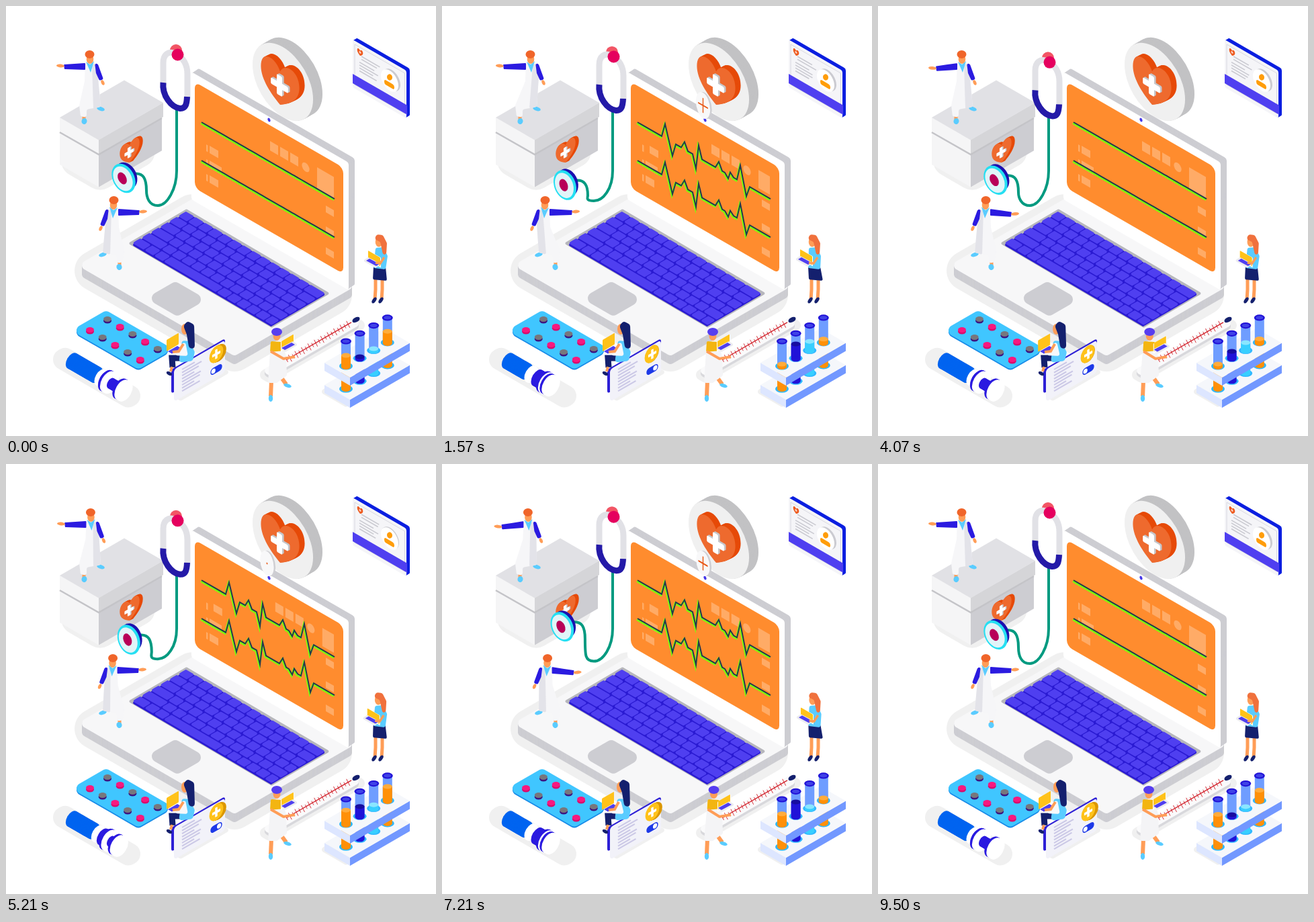
Animation of 640 by 640 pixels, one loop 9570 ms. Source, as an HTML page with a canvas:

```html
<!DOCTYPE html>
<html lang="en">
<head>
<meta charset="utf-8">
<title>Online medicine</title>
<style>
html, body { margin: 0; width: 100%; height: 100%; overflow: hidden; background: #fff; }
canvas { display: block; width: 640px; height: 640px; }
</style>
</head>
<body>
<canvas id="stage" width="640" height="640"></canvas>
<script>
const g = document.getElementById('stage').getContext('2d');
const LOOP = 9570, HALF = LOOP / 2, STEP = 1000 / 14, TAU = Math.PI * 2;
const SLOPE = .577, COS = .866;
const SKIN = '#ff9d57', HAIR = '#f0652a', BLUE = '#2b1be0', NAVY = '#14206e', CYAN = '#5accff';
const GOLD = '#ffc21a', SHADE = '#f0f0f0', GREY = '#cdcdd2', VIOLET = '#4f3ff0', GLASS = 'rgba(255,255,255,.27)';
let now = 0, phase = 0;

// Timing
const mix = (a, b, k) => a + (b - a) * k;
const ramp = (t, a, b) => (1 - Math.cos(Math.PI * Math.min(1, Math.max(0, (t - a) / (b - a))))) / 2;
const spell = (inFrom, inTo, outFrom, outTo) => ramp(phase, inFrom, inTo) * (1 - ramp(phase, outFrom, outTo));
const wave = (peak, period = HALF / 2) => Math.cos((phase - peak) / period * TAU);

// Drawing
function paint(fill, stroke, width) {
  if (fill) { g.fillStyle = fill; g.fill(); }
  if (stroke) { g.strokeStyle = stroke; g.lineWidth = width; g.stroke(); }
}
function poly(fill, pts, r = 0) {
  const first = pts[0], last = pts[pts.length - 1];
  g.beginPath();
  g.moveTo((first[0] + last[0]) / 2, (first[1] + last[1]) / 2);
  pts.forEach((p, i) => g.arcTo(...p, ...pts[(i + 1) % pts.length], r));
  g.closePath();
  paint(fill);
}
function oval(fill, x, y, rx, ry = rx, turn = 0) {
  g.beginPath();
  g.ellipse(x, y, rx, ry, turn, 0, TAU);
  paint(fill);
}
function line(color, width, ...pts) {
  g.beginPath();
  pts.forEach(p => g.lineTo(...p));
  paint(null, color, width);
}
const slanted = (color, width, x, y, w, dir) => line(color, width, [x, y], [x + w, y + w * SLOPE * dir]);

// Upright plane: dir 1 falls to the right, -1 rises.
function plane(x, y, dir, draw, sx = COS) {
  g.save();
  g.transform(sx, dir * sx * SLOPE, 0, 1, x, y);
  draw();
  g.restore();
}
function bar(fill, x, y, w, h, r = 0) {
  g.beginPath();
  g.roundRect(x, y, w, h, r);
  paint(fill);
}
const panel = (fill, x, y, w, h, dir, r) => plane(x, y, dir, () => bar(fill, 0, 0, w / COS, h, r));
function extrude(x, y, dir, dx, dy, side, front, shape) {
  const n = Math.max(1, Math.ceil(Math.hypot(dx, dy)));
  for (let i = n; i >= 0; i--) {
    plane(x + dx * i / n, y + dy * i / n, dir, () => shape(i ? side : front));
  }
}
// Flat rhombus from its left corner: a runs right-up, b runs right-down.
function floor(fill, x, y, a, b, r) {
  poly(fill, [[x, y], [x + a, y - a * SLOPE], [x + a + b, y + (b - a) * SLOPE], [x + b, y + b * SLOPE]], r);
}
function pad(x, y, a, b, h, side, top, r) {
  for (let i = h; i >= 0; i--) floor(i ? side : top, x, y + i, a, b, r);
}
function slab(x, y, a, b, h, left, right, top) {
  panel(left, x, y, b, h, 1);
  panel(right, x + b, y + b * SLOPE, a, h, -1);
  if (top) floor(top, x, y, a, b);
}
function heart(fill, s) {
  g.beginPath();
  g.moveTo(0, s);
  for (const k of [-s, s]) {
    g.moveTo(0, s);
    g.bezierCurveTo(.45 * k, .75 * s, k, .35 * s, k, -.25 * s);
    g.bezierCurveTo(k, -s, .25 * k, -1.05 * s, 0, -.5 * s);
  }
  paint(fill);
}
function cross(fill, s, w) {
  bar(fill, -w / 2, -s, w, s * 2, w / 5);
  bar(fill, -s, -w / 2, s * 2, w, w / 5);
}
function heartSign(x, y, dir, s, depth) {
  extrude(x, y, dir, depth, -depth / 2, '#e64a08', '#ee6a2e', c => heart(c, s));
  extrude(x - 1, y + s / 8, dir, depth / 3, -depth / 6, '#c6c6ca', '#fff', c => cross(c, s * .45, s * .28));
}

function heartDisc() {
  extrude(412, 113, 1, 14, -8, '#c2c2c4', '#f0f0f0', c => oval(c, 0, 0, 52));
  heartSign(408, 114, 1, 33, 8);
}

function keyboard() {
  const spot = (a, b) => [268 + a * 14.3 - b * 13.6, 305 + a * 8.4 + b * 8];
  const block = (fill, a0, a1, b0, b1, sink = 0) => poly(fill,
    [spot(a0, b0), spot(a1, b0), spot(a1, b1), spot(a0, b1)].map(([x, y]) => [x, y + sink]), 2);
  block('#b7b7bc', -.15, 14.8, -.2, 6.2);
  block('#2a1ad2', .05, 14.55, 0, 6, 2);
  for (let row = 0; row < 6; row++) {
    for (let a = 0, i = 0; a < 14.4; i++) {
      let w = i ? 1 : 1 + row * .27 % 1.1;
      if (row === 5 && i === 3) w = 5.5;
      if (a + w > 13.9) w = 14.6 - a;
      block(VIOLET, a + .04, a + w - .04, row + .06, row + .94);
      a += w;
    }
  }
}

function heartbeat(amp) {
  const peaks = [[332, -21], [343, 20], [361, -11], [378, 19], [382, -18],
    [412, -11], [426, 6], [429, -5], [444, -24], [453, 17]];
  const pts = [[291, 0]];
  let last = 291;
  for (const [x, d] of peaks) {
    if (x - last > 12) pts.push([last + 5, 0], [x - 5, 0]);
    pts.push([x, d * amp]);
    last = x;
  }
  pts.push([last + 5, 0], [489, 0]);
  for (const top of [173, 230]) {
    const curve = pts.map(([x, d]) => [x, top + (x - 291) * .576 + d]);
    line('#7dff0a', 3, ...curve.map(([x, y]) => [x - 1, y + 1.5]));
    line('#243a4c', 2, ...curve);
  }
}

function screen() {
  const m = spell(0, 400, 2300, 2800), shift = m * 8;
  const tile = (x, y, w, h) => panel(GLASS, x, y, w, h, 1);
  panel('#ff8c2e', 281, 113, 221, 158, 1, 9);
  for (let i = 0; i < 3; i++) {
    tile(393 + i * 15 + shift, 201 + i * 8.5 + shift * SLOPE, 12, 14);
    tile(476, mix(297, 288, m) + i * mix(31, 35, m), 12, 10);
    tile(298, 206 + i * 22, 2.5, 10);
    tile(303 + (i ? 0 : 6 * m), 208 + i * 22, 13 + i % 2 * 5, 11);
  }
  plane(446 + shift, 240 + shift * SLOPE, 1, () => oval(GLASS, 0, 0, 6.5));
  tile(463 + shift, 240 + m * 4, 25 - shift, mix(35, 27, m));
  heartbeat(ramp(phase, 0, 400) * (1 - ramp(phase, 2760, 3240)));
}

function laptop() {
  floor(SHADE, 72, 394, 205, 268, 30);
  pad(106, 386, 182, 234, 13, GREY, '#f7f7f8', 7);
  extrude(276, 98, 1, 9, -6, GREY, '#fff', c => bar(c, 0, 0, 234 / COS, 190, 4));
  screen();
  oval('#4436e8', 391.5, 169.5, 1.8, 3, -.4);
  floor(GREY, 208, 435, 44, 47, 9);
  keyboard();
}

function popup() {
  const hide = 1 - ramp(phase, 2300, 2700);
  const size = ramp(phase, 100, 400) * hide, arm = 11 * ramp(phase, 250, 800) * hide;
  if (size < .02) return;
  plane(391, 148, 1, () => oval('#cfcfd3', 0, 0, 19 * size), .56);
  plane(388.5, 148, 1, () => {
    oval('#f8f8f9', 0, 0, 19 * size);
    line('#e8530f', 2.4, [0, -arm], [0, arm]);
    line('#e8530f', 2.2, [-arm * 1.2, 0], [arm * 1.2, 0]);
  }, .56);
}

function box() {
  floor(SHADE, 58, 230, 106, 82, 24);
  slab(80, 166, 94, 58, 70, '#f5f5f6', GREY);
  slab(80, 166, 96, 58, 21, '#f5f5f6', '#d5d5d8', '#e1e1e5');
  line('#c4c4c8', 2.5, [80, 188], [138, 221], [232, 167]);
  heartSign(184, 216, -1, 17, 5);
}

function doctor() {
  const lean = spell(0, 1200, 1800, 2900) * 7, drop = spell(1800, 2900, 3300, 4700) * 8;
  const x = 125 + lean, hand = 81 + lean * .7, elbow = x + 18;
  line(SKIN, 5, [116, 160], [116, 171]);
  oval(CYAN, 116.5, 171.5, 4, 4.5, .3);
  oval(CYAN, 141, 153, 6, 3, .3);
  poly('#f6f6f8', [[x - 7, 83], [x + 8, 83], [x + 12, 105], [141, 150], [120, 154],
    [120, 166], [111, 164], [109, 148], [x - 8, 112]], 3);
  poly('#e3e3e9', [[x + 3, 88], [x + 9, 85], [x + 12, 107], [141, 150], [130, 153]], 2);
  poly(BLUE, [[x - 7, 85], [x - 7, 95], [hand + 6, 94 + drop * .8], [hand + 5, 87 + drop * .8]], 1);
  oval(SKIN, hand, 89 + drop, 6, 2.4, .1);
  poly(BLUE, [[x + 7, 84], [x + 12, 87], [elbow + 2, 109], [elbow - 4, 111], [x + 9, 100]], 2);
  oval(SKIN, elbow + 1, 114, 2.3, 4, -.4);
  poly(CYAN, [[x - 6, 83], [x, 87], [x + 6, 82], [x + 1, 99]]);
  oval(SKIN, x, 79, 5.3, 7);
  oval(HAIR, x - .5, 72, 7, 6);
}

function stethoscope() {
  const turn = now / LOOP * TAU, bob = 6 * (1 - Math.cos(turn));
  const m = spell(0, 400, 1800, 2900), x = 175 + m * 8;
  const y = 260 + 13.5 * Math.sin(turn) + 9 * wave(750);
  const low = mix(297, 290, m), elbow = x + 34, tilt = mix(-.48, -.36, m);
  g.lineCap = 'round';
  g.beginPath();
  g.moveTo(254, 152 + bob);
  g.lineTo(254, 245);
  g.bezierCurveTo(254, 272, 240, low, 226, low);
  g.bezierCurveTo(213, low, elbow, 285, elbow, Math.min(y + 18, 282));
  g.bezierCurveTo(elbow, y, elbow - 5, y - 8, x + 17, y - 7);
  paint(null, '#009a80', 4);
  g.save();
  g.translate(0, bob);
  oval('#f25565', 253, 66, 9);
  g.beginPath();
  g.moveTo(234, 116);
  g.lineTo(234, 85);
  g.bezierCurveTo(234, 72, 242, 66, 252, 71);
  g.bezierCurveTo(264, 76, 270, 88, 270, 101);
  g.lineTo(270, 137);
  paint(null, '#e1e1e6', 9);
  g.lineCap = 'butt';
  g.beginPath();
  g.moveTo(234, 114);
  g.bezierCurveTo(232, 133, 246, 151, 259, 152.5);
  g.bezierCurveTo(267, 153, 269, 147, 269.5, 135);
  paint(null, '#241aa8', 9);
  oval('#e5005e', 255.5, 72.5, 9);
  g.restore();
  oval('#1c10b0', x + 4, y - 4, 15, 21, tilt);
  oval('#25dff2', x, y, 16, 23, tilt);
  oval('#e1f4f8', x - 1, y + .5, 13, 19.5, tilt);
  oval('#b80058', x - 2, y, 6, 9.5, tilt);
}

function blister() {
  pad(97, 483, 52, 100, 2, '#188be8', '#40c6ff', 8);
  for (let i = 0; i < 10; i++) {
    const col = i >> 1, row = i % 2, pink = (col + row) % 2;
    const x = 151 - row * 26 + col * 18.7, y = 466 + row * 16 + col * 11;
    oval(pink ? '#d80c6c' : '#3d1580', x, y + 2.5, 6, 4);
    oval(pink ? '#f8187f' : '#77777d', x, y, 6, 4);
  }
}

function syringe() {
  const pull = 1 - spell(0, 700, 2930, 3400);
  // Cylinder along the axis, d px to the right of the near end.
  const tube = (d, len, r, c) => extrude(98 + d + len, 528 + (d + len) * SLOPE, -1,
    -len, -len * SLOPE, c, c, f => oval(f, 0, 0, r));
  const ring = (d, r) => {
    tube(d, 2, r, BLUE);
    tube(d + 3, 4, r, '#fff');
  };
  floor(SHADE, 54, 526, 34, 128, 16);
  tube(0, 28 + pull * 9, 10.5, '#0064f0');
  tube(34 + pull * 9, 2, 11, '#fff');
  tube(44 + pull * 5, 6, 11, BLUE);
  ring(54 - pull * 3, 14);
  tube(58, pull * 14, 7, BLUE);
  ring(59 + pull * 13, 13.5);
}

function thermometer() {
  floor(SHADE, 370, 549, 150, 22, 8);
  pad(380, 543, 136, 14, 4, '#d8d8dc', '#fafafb', 5);
  slanted('#d3222b', 1.3, 415, 528, 99, -1);
  for (let i = 0; i < 20; i++) {
    const x = 418 + i * 4.8, y = 527 - i * 2.8, h = 3 + i % 2 * 2;
    line('#d3222b', .9, [x - h / 2, y - h], [x + h / 2, y + h]);
  }
  oval(NAVY, 521, 467, 6, 3.5, -.5);
}

function rack() {
  const levels = [524 - 9 * wave(425), 522 - 19 * spell(0, 600, 3300, 4700),
    503 + 7 * wave(0), 497 - 17 * ((1 + wave(400, HALF)) / 2) ** 4];
  const liquids = [['#ff9008', '#ffac3c'], ['#2012d8', '#170ca0'], ['#38cfff', '#8ae6ff'], ['#ff9008', '#ffac3c']];
  const pillar = (x, top, bottom, c) => {
    bar(c, x - 7, top, 14, bottom - top);
    oval(c, x, bottom, 7, 4);
  };
  const eachTube = draw => liquids.forEach((c, i) => draw(506 + i * 20.6, 499 - i * 11.7, c, levels[i]));
  const shelf = y => slab(474, y, 89, 38, 12, '#dde6ff', '#7298ff', '#f5f7fb');
  floor(SHADE, 466, 574, 30, 40, 4);
  shelf(564);
  eachTube((x, y, [body]) => {
    oval('#2fb8ff', x, y + 71, 10, 5.5);
    pillar(x, y + 40, y + 71, body);
  });
  shelf(531);
  eachTube((x, y, [body, top], level) => {
    oval('#2fb8ff', x, y + 37, 10, 5.5);
    pillar(x, y, y + 38, '#6f9dff');
    pillar(x, level, y + 38, body);
    oval(top, x, level, 7, 3.5);
    oval('#2112d8', x, y, 8, 4.6);
    oval('#3f42e6', x, y, 5.5, 2.6);
  });
}

function idCard() {
  extrude(516, 50, 1, 5, -3, '#0b1fe0', '#f5f5f8', c => bar(c, 0, 0, 80 / COS, 71, 3));
  plane(519, 57, 1, () => {
    g.beginPath();
    g.rect(0, 0, 86, 60);
    paint(null, '#d4d4dc', .8);
  });
  panel(VIOLET, 516, 101, 81, 14, 1);
  plane(527, 69, 1, () => { heart('#ee5a1e', 5); cross('#fff', 2, 1); });
  for (let i = 0; i < 6; i++) {
    const w = 24 + 4 * Math.sin(i * 2.4 + wave(0));
    slanted('#c9c9d0', 1.5, i < 2 ? 529 : 526, 75 + i * 4.3, w, 1);
  }
  const flat = ramp(wave(450), .7, .95);
  plane(574 - flat * 2, 110, 1, () => oval('#cbcbd1', 0, 0, 15));
  plane(571, 111, 1, () => oval('#fff', 0, 0, 15));
  oval('#ff9d0a', 571, 106, 4, 4.7, -.2);
  panel('#ff9d0a', 563, 109, 15, 7, 1, 3);
}

function messageCard() {
  floor(SHADE, 250, 582, 74, 10, 3);
  panel('#2d1fd6', 246, 541, 80, 36, -1, 4);
  panel('#f2f2f9', 250, 541, 76, 48, -1, 5);
  for (let i = 0; i < 8; i++) {
    slanted('#cbc8e6', 2, 262, 541 + i * 4.6, 24 + 6 * Math.sin(i * 2 - 1), -1);
  }
  const side = ramp(wave(200), .2, .6), on = spell(0, 400, 2300, 2800);
  extrude(312 + side, 518, -1, side * 4 + .5, -side * 1.5, '#dc9800', GOLD, c => oval(c, 0, 0, 12));
  plane(313, 518, -1, () => cross('#fff', 7, 4));
  plane(313, 541, -1, () => {
    bar('#1d39e8', -10, -5, 20, 10, 5);
    oval('#fff', mix(-5, 5, on), 0, 3.6);
  });
}

// Small open laptop; dir as for planes.
function notebook(x, y, dir) {
  const w = 20, left = dir > 0 ? x - 10 : x - 9;
  panel('#fff', left, y - 6 * dir, w, 15, dir, 1);
  panel(GOLD, left + 1, y - 5 * dir, w - 2, 13, dir, 1);
  g.save();
  g.translate(x, y);
  g.scale(dir, 1);
  poly('#ececf0', [[-17, 10], [-9, 5], [10, 15], [2, 21]], 2);
  poly(VIOLET, [[-12, 10], [-7, 7], [8, 15], [3, 18]]);
  g.restore();
}

function sittingWoman() {
  const d = spell(1800, 2900, 3300, 4700) * 2;
  line(NAVY, 9, [270, 524], [247, 524], [248, 538]);
  line(SKIN, 4, [247, 537], [245, 544]);
  oval(NAVY, 243, 547, 4.5, 2.5, .5);
  poly(CYAN, [[262 - d, 498], [273 - d, 499], [281, 515], [278, 528], [257, 531]], 4);
  poly('#f6f8fb', [[261 - d, 503], [267 - d, 500], [271, 521], [250, 520]], 3);
  oval(SKIN, 266 - d, 481, 5, 8);
  poly(NAVY, [[264 - d, 476], [270 - d, 469], [280 - d, 474], [281 - d, 508], [273 - d, 513], [269 - d, 489]], 5);
  panel(GOLD, 239 - d, 497 + d, 18, 17, -1, 1);
  floor(VIOLET, 241, 514, 14, 6);
  line(SKIN, 4, [264 - d, 503], [257, 514], [248, 515]);
}

function standingMan() {
  const d = spell(1800, 2900, 3300, 4700) * 3;
  line(SKIN, 6, [395, 558], [394, 581]);
  line(SKIN, 6, [409, 552], [417, 563]);
  oval(CYAN, 394, 584, 3.2, 5);
  oval(CYAN, 419, 565, 6, 2.7, .3);
  poly('#f4f4f6', [[394 + d, 499], [410 + d, 499], [417, 521], [418, 550], [403, 561], [390, 561]], 3);
  poly('#f3b511', [[394 + d, 499], [411 + d, 500], [414 + d, 513], [393 + d, 515]], 2);
  line(SKIN, 4, [394 + d, 514], [413, 525], [430, 522]);
  oval(SKIN, 403 + d, 491, 5.5, 7);
  oval('#563df0', 403 + d, 485, 8, 6);
  notebook(418 + d * .6, 494 + d * 2, -1);
}

function standingWoman() {
  const d = spell(0, 1200, 1600, 4500) * 4;
  for (const x of [550, 560]) {
    line(SKIN, 5, [x, 403], [x, 422], [x - 1, 437]);
    oval(NAVY, x - 2, 438, 2.6, 5, .6);
  }
  poly(NAVY, [[547 - d / 2, 388], [565 - d / 2, 388], [567, 409], [546, 407]], 2);
  poly(CYAN, [[550 - d, 360], [562 - d, 359], [568 - d, 372], [565 - d / 2, 392], [547 - d / 2, 390]], 3);
  oval(SKIN, 555 - d, 351, 5.3, 7.5);
  poly('#f0713d', [[548 - d, 347], [552 - d, 340], [561 - d, 341], [567 - d, 353], [566 - d, 370],
    [561 - d, 370], [557 - d, 351]], 4);
  notebook(548 - d * 1.5, 369 - d / 2, 1);
  line(SKIN, 3.5, [563 - d, 374], [557 - d, 383], [550 - d, 382]);
}

function draw(time) {
  now = Math.floor((time % LOOP + 3) / STEP) * STEP % LOOP;
  phase = now % HALF;
  g.fillStyle = '#fff';
  g.fillRect(0, 0, 640, 640);
  g.lineCap = 'butt';
  for (const part of [heartDisc, laptop, popup, box, doctor, stethoscope]) part();
  g.lineCap = 'butt';
  // The second doctor mirrors the first.
  g.save();
  g.translate(285, 217);
  g.scale(-1, 1);
  doctor();
  g.restore();
  for (const part of [blister, syringe, thermometer, rack, idCard, messageCard,
    sittingWoman, standingMan, standingWoman]) part();
}

const start = performance.now();
function tick() {
  draw(performance.now() - start);
  requestAnimationFrame(tick);
}
tick();
</script>
</body>
</html>
```
